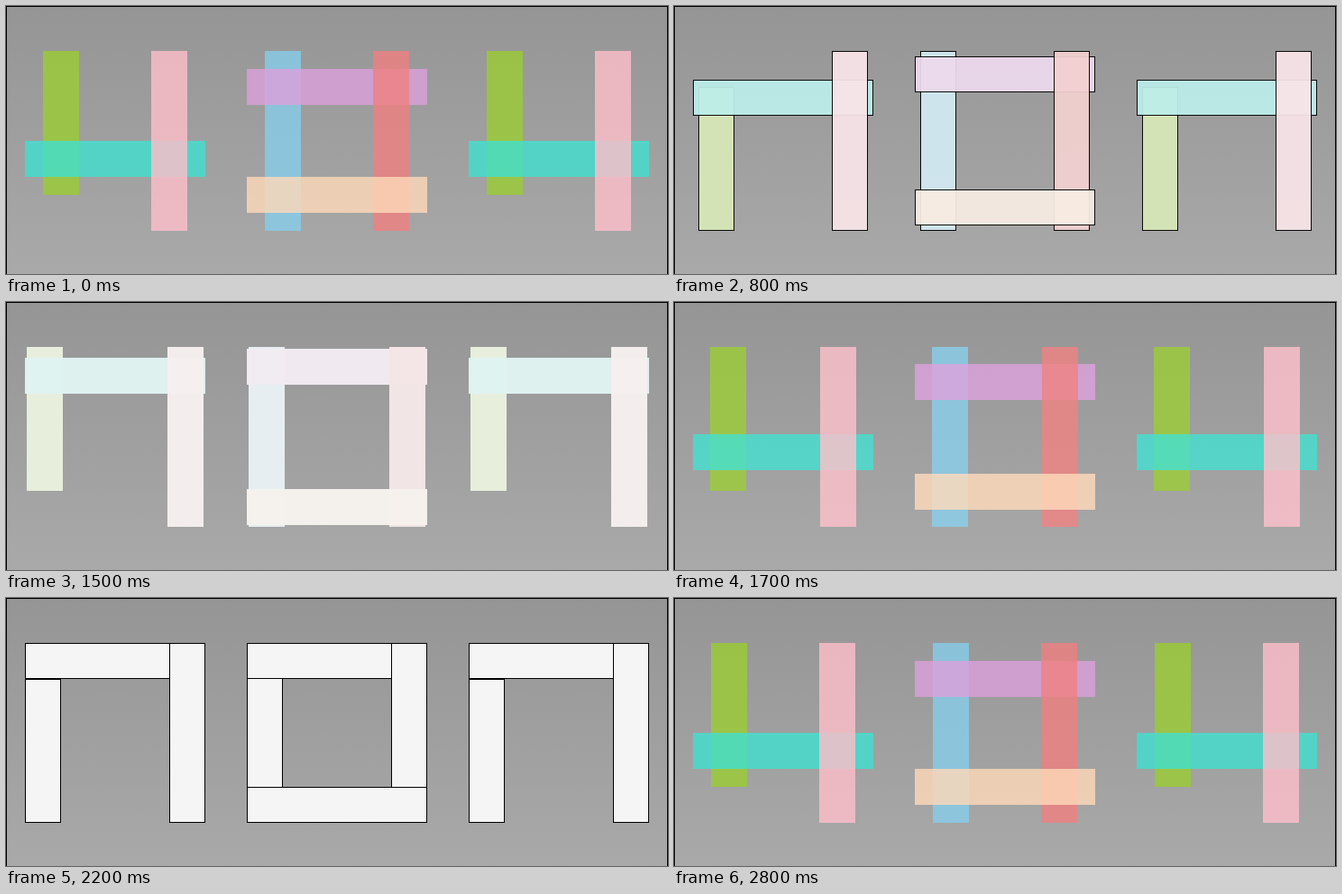
Animation of 734x298 px, one loop 2.9 s. Source, as an HTML page:

```html
<!DOCTYPE html>
<html lang="en">
<head>
<meta charset="utf-8">
<title>404</title>
<style>
  html, body { margin: 0; width: 100%; height: 100%; overflow: hidden; }
  #stage {
    --p: 0;
    position: relative;
    box-sizing: border-box;
    width: 734px;
    height: 298px;
    border: 1px solid #000;
    border-bottom: 0;
    background: linear-gradient(#959595, #a9a9a9);
    overflow: hidden;
  }
  .digit { position: absolute; top: 49px; width: 200px; height: 200px; }
  .digit:nth-child(1) { left: 20px; }
  .digit:nth-child(2) { left: 266px; }
  .digit:nth-child(3) { left: 512px; }

  .digit i {
    position: absolute;
    box-sizing: border-box;
    left: 0;
    top: 0;
    width: 40px;
    height: 200px;
    background: color-mix(in srgb, whitesmoke calc(var(--p) * 100%), var(--c));
    opacity: calc(.8 + .2 * var(--p));
  }
  .open i { border: 1px solid #000; }
  .digit .left { left: calc(20px - 20px * var(--p)); }
  .digit .right { left: calc(140px + 20px * var(--p)); }
  .digit .bar { width: 200px; height: 40px; }

  .four .left { --c: yellowgreen; height: 160px; }
  .open .four .left { top: 40px; }
  .four .bar { --c: turquoise; top: calc(100px - 100px * var(--p)); }
  .four .right { --c: pink; }

  .zero .left { --c: skyblue; }
  .zero .bar { --c: plum; top: calc(20px - 20px * var(--p)); }
  .zero .right { --c: lightcoral; }
  .zero .base { --c: peachpuff; top: calc(140px + 20px * var(--p)); }
</style>
</head>
<body>
<div id="stage">
  <div class="digit four"><i class="left"></i><i class="bar"></i><i class="right"></i></div>
  <div class="digit zero"><i class="left"></i><i class="bar"></i><i class="right"></i><i class="bar base"></i></div>
  <div class="digit four"><i class="left"></i><i class="bar"></i><i class="right"></i></div>
</div>
<script>
  const LOOP = 2900, TICK = 100, DURATION = 300;
  // Start times of the moves, alternately opening and closing
  const MOVES = [680, 1466, 1848, 2467];
  const stage = document.getElementById('stage');

  // cubic-bezier(.25, .1, .25, 1), solved by bisection
  function ease(x) {
    if (x >= 1) return 1;
    let lo = 0, hi = 1;
    for (let i = 0; i < 24; i++) {
      const s = (lo + hi) / 2;
      if (.75 * s * (1 - s) + s ** 3 < x) lo = s; else hi = s;
    }
    return .3 * lo * (1 - lo) ** 2 + 3 * lo * lo * (1 - lo) + lo ** 3;
  }

  function draw(time) {
    const t = Math.floor(time % LOOP / TICK) * TICK;
    const begun = MOVES.filter(start => start <= t);
    const open = begun.length % 2 === 1;
    const k = begun.length ? ease((t - begun[begun.length - 1]) / DURATION) : 1;
    stage.classList.toggle('open', open);
    stage.style.setProperty('--p', (open ? k : 1 - k).toFixed(4));
  }

  const t0 = performance.now();
  function loop() {
    draw(performance.now() - t0);
    requestAnimationFrame(loop);
  }
  loop();
</script>
</body>
</html>
```
